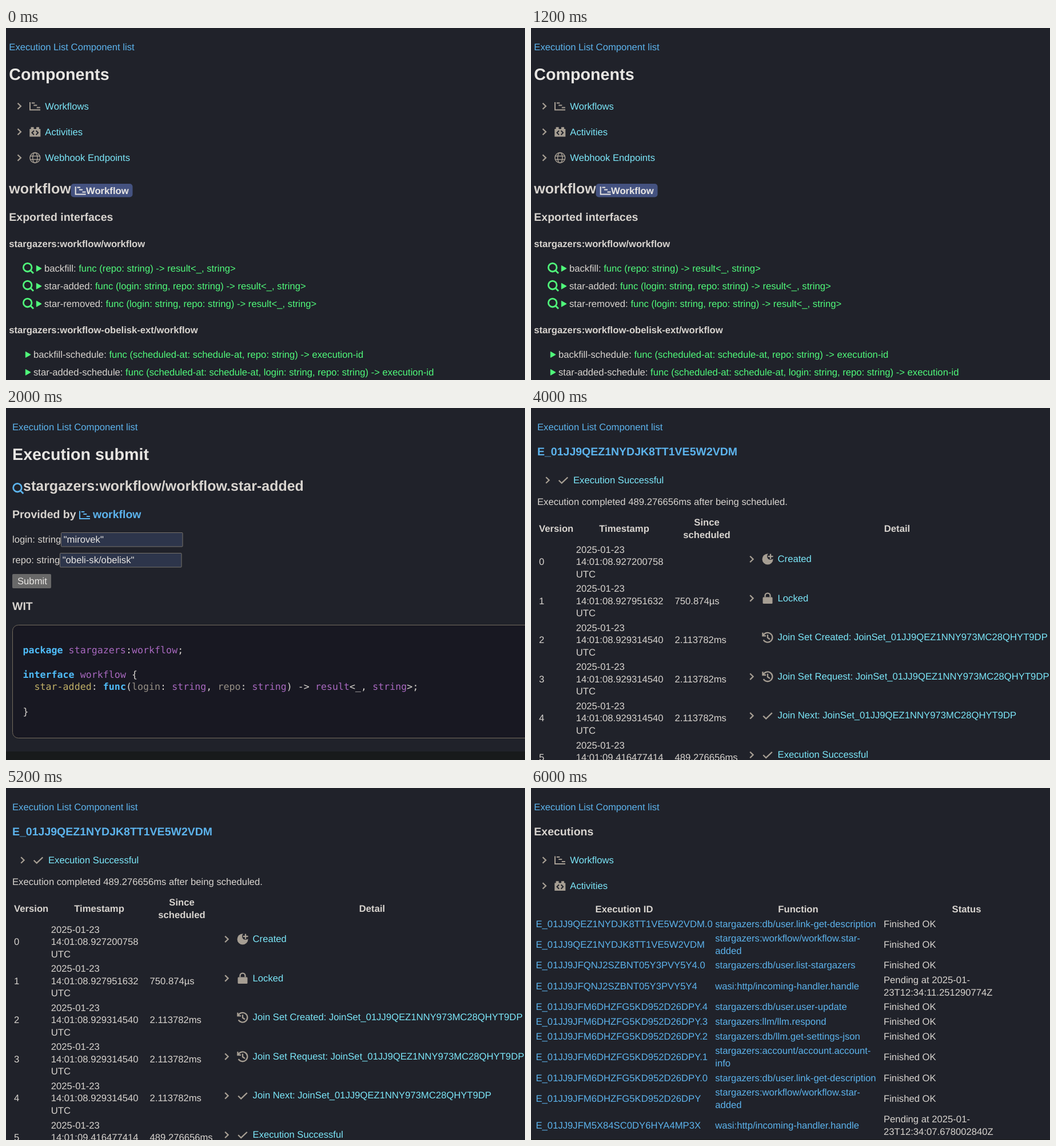
Write an HTML page that moves like this. It is 908 by 617 pixels and loops after 8000 ms.

```html
<!DOCTYPE html>
<html lang="en">
<head>
<meta charset="utf-8">
<title>Workflow console</title>
<style>
html, body { margin: 0; width: 100%; height: 100%; overflow: hidden; background: #20222a; }
svg { display: block; width: 908px; height: 617px; }
text { font: 16.667px "Liberation Sans", Arial, sans-serif; fill: currentColor; white-space: pre; text-rendering: geometricPrecision; }
.h1 { font-size: 28.7px; }
.h2 { font-size: 25px; }
.h3 { font-size: 19.5px; }
.b { font-weight: bold; }
.mid { text-anchor: middle; }
.code { font-family: "DejaVu Sans Mono", monospace; }
.page { color: #d8d4cf; }
.title { color: #e8e6e3; }
.link { color: #5cb3ec; }
.sum { color: #7be6f8; }
.green { color: #50fa7b; }
.icon { color: #a69e93; }
.key { color: #4fbcf9; font-weight: bold; }
.type { color: #a868bf; }
.name { color: #c1b067; }
.arg { color: #968f85; }
.line { fill: none; stroke: currentColor; stroke-width: 2.3; }
.solid { fill: currentColor; }
.cut { stroke: #20222a; }
</style>
</head>
<body>
<svg viewBox="0 0 908 617">
  <defs>
    <path id="chevron" class="line" d="M-2.8-5.3L2.6 0-2.8 5.3"/>
    <path id="check" class="line" d="M-7.8.3L-2.8 5.2 7.8-5"/>
    <path id="gantt" class="line" style="stroke-width:2" d="M-8.8-7V6.4H9.2M-6-5.6H-.5M-2.5-1.6H3.5M3 2.4H9"/>
    <g id="brick">
      <path class="solid" d="M-9.5-5h2.3v-3.2h5V-5h4.4v-3.2h5V-5h2.3V8.4h-19z"/>
      <path class="line cut" style="stroke-width:2" d="M-1.8-2L-5.3 1.6-1.8 5.2M1.8-2L5.3 1.6 1.8 5.2"/>
    </g>
    <g id="globe" class="line" style="stroke-width:1.5">
      <circle r="8.9"/><ellipse rx="4.2" ry="8.9"/><path d="M-8.5-3H8.5M-8.5 3H8.5"/>
    </g>
    <g id="search" class="line" style="stroke-width:2.8">
      <circle cx="-1.3" cy="-1.3" r="7.3"/><path d="M4 4L9 9"/>
    </g>
    <path id="play" class="solid" stroke="currentColor" stroke-linejoin="round" d="M-4.2-5L4.6 0-4.2 5z"/>
    <g id="created">
      <circle class="solid" r="9.5"/><circle cx="5" cy="-5" r="6" fill="#20222a"/>
      <path class="line" d="M5-9.3v9M.5-4.8h9"/>
    </g>
    <g id="lock">
      <rect class="solid" x="-8.5" y="-2" width="17" height="11.5" rx="1.5"/>
      <path class="line" d="M-4.5-2V-4.5a4.5 4.5 0 0 1 9 0V-2"/>
    </g>
    <path id="history" class="line" d="M-7.8-3.2A8.4 8.4 0 1 1-7.3 4.3M-8.6-8.5v5.7h5.7M0-5V.5L4 3.3"/>
  </defs>
</svg>
<script>
const svg = document.querySelector("svg");
const esc = s => s.replace(/</g, "&lt;").replace(/>/g, "&gt;");
const text = (x, y, s, cls = "") => `<text x="${x}" y="${Math.round(y)}" class="${cls}">${esc(s)}</text>`;
// parts: [string, class] pairs set on one line
const rich = (x, y, parts, cls = "") => `<text x="${x}" y="${y}" class="${cls}">` +
  parts.map(([s, c = ""]) => `<tspan class="${c}">${esc(s)}</tspan>`).join("") + "</text>";
const icon = (id, x, y, cls = "icon") => `<use href="#${id}" x="${x}" y="${y}" class="${cls}"/>`;
const box = (x, y, w, h, r, fill, stroke = "none") =>
  `<rect x="${x}" y="${y}" width="${w}" height="${h}" rx="${r}" fill="${fill}" stroke="${stroke}"/>`;
const nav = x => text(x, 39, "Execution List Component list", "link");
const fold = (x, y, id, s) => icon("chevron", x + 18, y) + icon(id, x + 45.5, y) + text(x + 63, y + 5.5, s, "sum");

function components() {
  const func = (x, y, name, sig) =>
    icon("play", x - 9.5, y - 5.5, "green") + rich(x, y, [[name + ": "], ["func (" + sig, "green"]]);
  const find = (y, name, sig) =>
    icon("search", 39, y - 6, "green") + func(67, y, name, sig + ") -> result<_, string>");
  return nav(5.3) + text(5.3, 91, "Components", "h1 b title") +
    fold(5.3, 137, "gantt", "Workflows") +
    fold(5.3, 182, "brick", "Activities") +
    fold(5.3, 227.5, "globe", "Webhook Endpoints") +
    text(5.3, 290, "workflow", "h2 b") + box(113.5, 273, 108, 23.5, 5, "#445280") +
    icon("gantt", 130.5, 285, "title") + text(140, 291, "Workflow", "b title") +
    text(5.3, 338, "Exported interfaces", "h3 b") +
    text(5.3, 384, "stargazers:workflow/workflow", "b") +
    find(427, "backfill", "repo: string") +
    find(458, "star-added", "login: string, repo: string") +
    find(489, "star-removed", "login: string, repo: string") +
    text(5.3, 535, "stargazers:workflow-obelisk-ext/workflow", "b") +
    func(48, 578, "backfill-schedule", "scheduled-at: schedule-at, repo: string) -> execution-id") +
    func(48, 609, "star-added-schedule", "scheduled-at: schedule-at, login: string, repo: string) -> execution-id");
}

function submit() {
  const field = (y, label, x, value) => text(11, y, label) +
    box(x, y - 17.5, 212.5, 24.5, 1, "#2d354b", "#77726b") + text(x + 4.2, y, value, "title");
  const code = (y, ...parts) => rich(29.4, y, parts, "code");
  return nav(11) + text(11, 91, "Execution submit", "h1 b title") +
    icon("search", 21.3, 141, "link") + text(30, 145, "stargazers:workflow/workflow.star-added", "h2 b") +
    text(11, 193, "Provided by", "h3 b") + icon("gantt", 137.8, 187.5, "link") + text(152, 193, "workflow", "h3 b link") +
    field(236, "login: string", 96.5, '"mirovek"') +
    field(272, "repo: string", 94.5, '"obeli-sk/obelisk"') +
    box(11, 291, 68, 25, 2, "#696969") + text(20, 309, "Submit", "title") +
    text(11, 354, "WIT", "h3 b") +
    box(11.5, 380.5, 950, 198, 10, "#181822", "#736b5e") +
    code(430, ["package", "key"], [" stargazers", "type"], [":"], ["workflow", "type"], [";"]) +
    code(473, ["interface", "key"], [" workflow", "type"], [" {"]) +
    code(494, ["  star-added", "name"], [": "], ["func", "key"], ["("], ["login", "arg"], [": "], ["string", "type"],
      [", "], ["repo", "arg"], [": "], ["string", "type"], [") -> "], ["result", "type"], ["<_, "], ["string", "type"], [">;"]) +
    code(538, ["}"]) + box(0, 602, 908, 15, 0, "#181a1b");
}

function details() {
  const set = "JoinSet_01JJ9QEZ1NNY973MC28QHYT9DP";
  const rows = [
    ["08.927200758", "", "created", "Created"],
    ["08.927951632", "750.874µs", "lock", "Locked"],
    ["08.929314540", "2.113782ms", "history", "Join Set Created: " + set],
    ["08.929314540", "2.113782ms", "history", "Join Set Request: " + set],
    ["08.929314540", "2.113782ms", "check", "Join Next: " + set],
    ["09.416477414", "489.276656ms", "check", "Execution Successful"]
  ];
  return nav(11) + text(11, 83, "E_01JJ9QEZ1NYDJK8TT1VE5W2VDM", "h3 b link") +
    fold(11, 126.5, "check", "Execution Successful") +
    text(11, 170, "Execution completed 489.276656ms after being scheduled.") +
    text(44.2, 217, "Version", "b mid") + text(163, 217, "Timestamp", "b mid") +
    text(307.5, 206, "Since", "b mid") + text(307.5, 228, "scheduled", "b mid") + text(640.5, 217, "Detail", "b mid") +
    rows.map(([time, since, id, label], i) => {
      const y = 275 + i * 68.6;
      return text(14.1, y, String(i)) + text(78.7, y - 21.5, "2025-01-23") + text(78.7, y, "14:01:" + time) +
        text(78.7, y + 21.5, "UTC") + text(251.5, y, since) +
        (i === 2 ? "" : icon("chevron", 386, y - 10)) +
        icon(id, 414, y - 10) + text(431.6, y - 5, label, "sum");
    }).join("");
}

function executions() {
  const a = "E_01JJ9QEZ1NYDJK8TT1VE5W2VDM", b = "E_01JJ9JFQNJ2SZBNT05Y3PVY5Y4", c = "E_01JJ9JFM6DHZFG5KD952D26DPY";
  const ok = "Finished OK", link = "stargazers:db/user.link-get-description";
  const star = "stargazers:workflow/workflow.star-\nadded", http = "wasi:http/incoming-handler.handle";
  const pending = t => "Pending at 2025-01-\n23T12:34:" + t + "Z";
  const rows = [
    [244, a + ".0", link, ok],
    [280, a, star, ok],
    [316, b + ".0", "stargazers:db/user.list-stargazers", ok],
    [353, b, http, pending("11.251290774")],
    [389, c + ".4", "stargazers:db/user.user-update", ok],
    [415, c + ".3", "stargazers:llm/llm.respond", ok],
    [441, c + ".2", "stargazers:db/llm.get-settings-json", ok],
    [477, c + ".1", "stargazers:account/account.account-\ninfo", ok],
    [514, c + ".0", link, ok],
    [550, c, star, ok],
    [597, "E_01JJ9JFM5X84SC0DY6HYA4MP3X", http, pending("07.678002840")]
  ];
  const cell = (x, y, s, cls) => s.split("\n").map((line, i, all) =>
    text(x, y + (i - (all.length - 1) / 2) * 21.4, line, cls)).join("");
  return nav(5.3) + text(5.3, 83, "Executions", "h3 b") +
    fold(5.3, 126.5, "gantt", "Workflows") + fold(5.3, 171.5, "brick", "Activities") +
    text(163, 218, "Execution ID", "b mid") + text(467.5, 218, "Function", "b mid") + text(762, 218, "Status", "b mid") +
    rows.map(([y, id, fn, status]) => cell(8.5, y, id, "link") + cell(322.2, y, fn, "link") + cell(617, y, status)).join("") +
    box(0, 616, 908, 1, 0, "#181a1b");
}

const pages = [components, submit, details, executions].map(draw => {
  svg.insertAdjacentHTML("beforeend", `<g class="page">${draw()}</g>`);
  return svg.lastElementChild;
});
const start = performance.now();
function tick() {
  const current = Math.floor((performance.now() - start) % 8000 / 2000);
  pages.forEach((page, i) => page.style.display = i === current ? "" : "none");
  requestAnimationFrame(tick);
}
tick();
</script>
</body>
</html>
```
